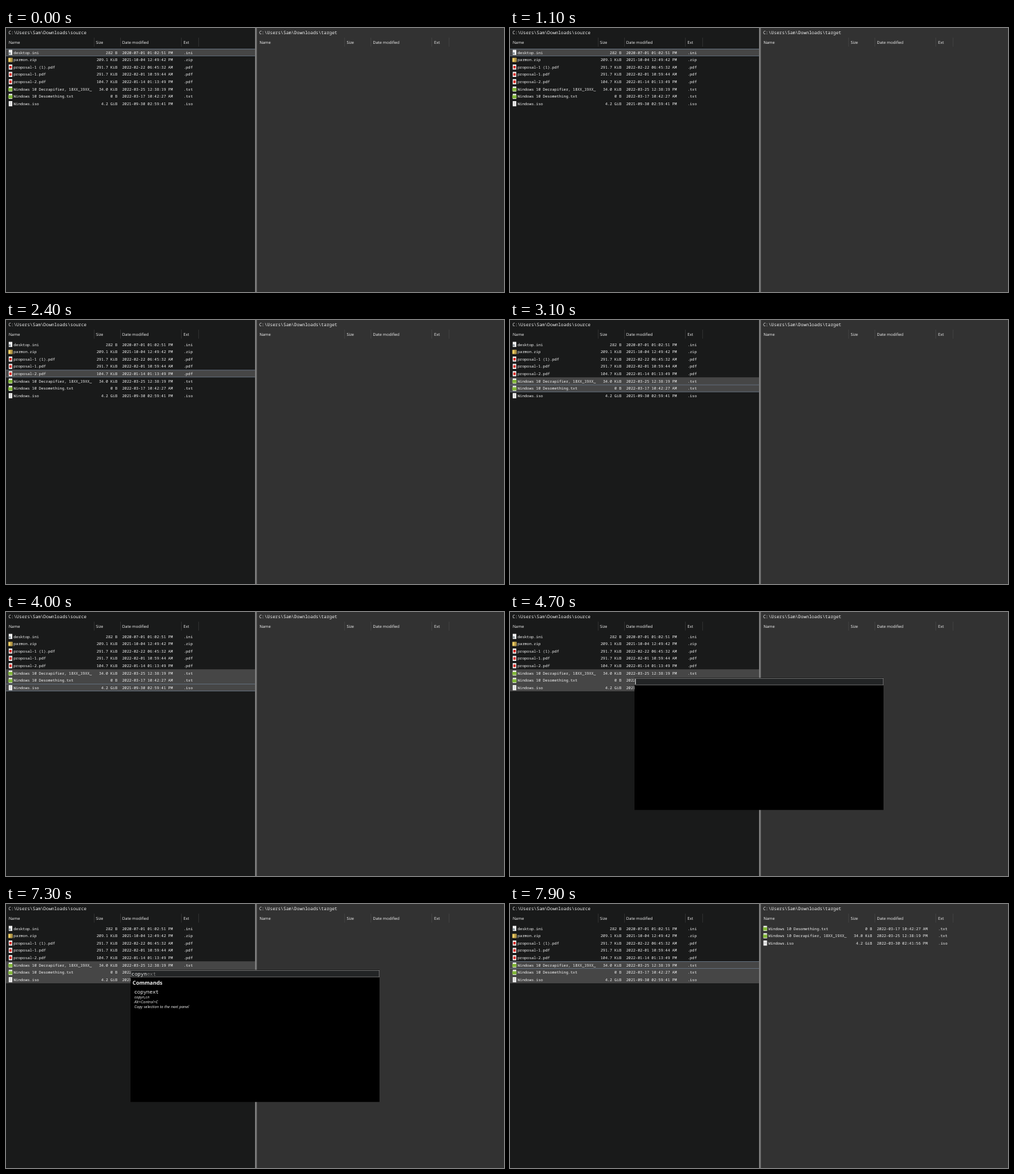
An HTML page for the animation above (8 s loop, 720 by 383 pixels).

```html
<!DOCTYPE html>
<html lang="en">
<head>
<meta charset="utf-8">
<title>Dual-pane file copy</title>
<style>
  html, body { margin: 0; width: 100%; height: 100%; overflow: hidden; background: #191a1a; }
  svg { display: block; width: 100%; height: 100%; }
  text { fill: #f0f0f0; white-space: pre; text-rendering: geometricPrecision; }
  .cell, .path, .cmd { font-family: "Noto Sans Mono", "DejaVu Sans Mono", monospace; }
  .head, .title, .note { font-family: "Open Sans", "Noto Sans", sans-serif; }
  .cell { font-size: 5.56px; }
  .path { font-size: 6.5px; }
  .cmd { font-size: 7.39px; }
  .head { font-size: 5.8px; }
  .title { font-size: 7.7px; font-weight: 700; }
  .note { font-size: 5.7px; font-style: italic; }
  .end { text-anchor: end; }
  .ghost { fill: #7c7c7c; }
</style>
</head>
<body>
<svg id="stage" viewBox="0 0 720 383" preserveAspectRatio="none"></svg>
<script>
const LOOP = 8000, ROW = 10.63, TOP = 30, CHAR = 4.434;
const USER = 'C:\\Users\\Sam\\';

const files = [
  ['desktop.ini', '282 B', '2020-07-01 01:02:51 PM', 'ini'],
  ['parmon.zip', '209.1 KiB', '2021-10-04 12:49:42 PM', 'zip'],
  ['proposal-1 (1).pdf', '291.7 KiB', '2022-02-22 06:45:32 AM', 'pdf'],
  ['proposal-1.pdf', '291.7 KiB', '2022-02-01 10:59:44 AM', 'pdf'],
  ['proposal-2.pdf', '104.7 KiB', '2022-01-14 01:13:49 PM', 'pdf'],
  ['Windows 10 Decrapifier, 18XX_19XX_', '34.0 KiB', '2022-03-25 12:38:19 PM', 'txt'],
  ['Windows 10 Desomething.txt', '0 B', '2022-03-17 10:42:27 AM', 'txt'],
  ['Windows.iso', '4.2 GiB', '2021-09-30 02:59:41 PM', 'iso']
];
const copies = [files[6], files[5], ['Windows.iso', '4.2 GiB', '2022-03-30 02:41:56 PM', 'iso']];

// Each step: [start time, value]
const focusSteps = [[0, 0], [1800, 1], [2000, 2], [2200, 3], [2300, 4], [2500, 5], [3000, 6], [3300, 7], [7700, 5]];
const markSteps = [[0, 0], [3000, 2], [3300, 3]];
const copySteps = [[0, 0], [7800, 2], [7900, 3]];
const typeSteps = [[4700, 0], [5700, 1], [6000, 2], [6200, 3], [6400, 4], [6700, 5]];
const OPEN = 4700, LISTED = 4900, CLOSE = 7700;

const stepAt = (steps, t) => steps.filter(s => s[0] <= t).pop();

const rect = (x, y, w, h, fill, extra = '') =>
  `<rect x="${x}" y="${y}" width="${w}" height="${h}" fill="${fill}" ${extra}/>`;
const text = (x, y, cls, s) => `<text x="${x}" y="${y}" class="${cls}">${s}</text>`;

function icon(x, y, type) {
  if (type === 'zip')
    return rect(x, y + 1, 6, 6, '#f2cf63') + rect(x + 3.4, y + 1, 1.4, 6, '#8d7433');
  const page = rect(x + .5, y, 5.2, 7.4, '#f1f1f1');
  if (type === 'pdf') return page + rect(x + 1.4, y + 2, 3.4, 3.6, '#d8261c');
  if (type === 'txt') return page + rect(x, y + 2, 6, 4.6, '#83b83a');
  if (type === 'ini') return page + `<circle cx="${x + 2}" cy="${y + 5}" r="1.6" fill="#8c969c"/>`;
  return page + rect(x + 1.5, y + 2, 3, .6, '#aaa') + rect(x + 1.5, y + 4, 3, .6, '#aaa');
}

function fileRow([name, size, date, ext], i, x) {
  const y = TOP + i * ROW, base = y + 7.5;
  return icon(x + 3.4, y + 1.7, ext) + text(x + 11, base, 'cell', name) +
    text(x + 161, base, 'cell end', size) + text(x + 168, base, 'cell', date) +
    text(x + 256.7, base, 'cell', '.' + ext);
}

function panel(x, dir, list, line) {
  const heads = [[4, 'Name'], [130, 'Size'], [168, 'Date modified'], [256.5, 'Ext']];
  return text(x + 3.4, 9.2, 'path', USER + 'Downloads\\' + dir) +
    heads.map(([dx, s]) => text(x + dx, 22.7, 'head', s)).join('') +
    [127, 165, 253, 278].map(dx => rect(x + dx, 14, .6, 13, line)).join('') +
    list.map((f, i) => fileRow(f, i, x)).join('');
}

function highlights(t) {
  const focus = stepAt(focusSteps, t)[1], marks = stepAt(markSteps, t)[1];
  const dialog = t >= OPEN && t < CLOSE;
  let out = rect(0, TOP + 5 * ROW, 360, marks * ROW, '#464646');
  if (dialog) return out;
  const y = TOP + focus * ROW;
  out += rect(0, y, 360, ROW, '#464646');
  for (const edge of [y, y + ROW - .6]) out += rect(0, edge, 360, .6, '#708296');
  return out;
}

function command(y, name, alias, keys, note) {
  return text(185.4, y, 'cmd', name) +
    [alias, keys, note].map((s, i) => text(185.4, y + 7.2 + i * 7.1, 'note', s)).join('');
}

function results(typed, narrowed) {
  let y = 116.8, out = '';
  if (typed < 3) {
    out += text(183, y, 'title', 'History') +
      text(185.4, y + 12.8, 'cmd', USER + 'AppData\\Local\\Brows\\data\\BookmarkCollectionModel');
    y += 26;
  }
  out += text(183, y, 'title', 'Commands') +
    command(y + 12.8, 'copynext', 'copyn,cn', 'Alt+Control+C', 'Copy selection to the next panel');
  if (!narrowed)
    out += command(y + 45.1, 'copyprev', 'copyp,cp', 'Alt+Control+Shift+C', 'Copy selection to the previous panel');
  return out;
}

function dialog(t) {
  if (t < OPEN || t >= CLOSE) return '';
  const [since, typed] = stepAt(typeSteps, t), word = 'copynext', x = 181.5;
  let out = rect(180, 95.6, 360, 191.6, '#000') +
    rect(180.8, 96.3, 358.9, 9.6, '#222425', 'stroke="#858585" stroke-width=".7"');
  if (typed)
    out += text(x, 103.6, 'cmd', word.slice(0, typed)) +
      text(x + typed * CHAR, 103.6, 'cmd ghost', word.slice(typed));
  if (t - since < 600) out += rect(x + typed * CHAR - .2, 97, .7, 8, '#fff');
  return out + (t >= LISTED ? results(typed, t >= 6800) : '');
}

const stage = document.getElementById('stage');
let shown = '';

function draw() {
  const t = performance.now() % LOOP;
  const picture = rect(0, 0, 720, 383, '#191a1a') + rect(362, 0, 358, 383, '#323232') +
    highlights(t) +
    panel(0, 'source', files, '#3b3b3b') +
    panel(362.5, 'target', copies.slice(0, stepAt(copySteps, t)[1]), '#4b4b4b') +
    rect(360, 0, 2.6, 383, '#7c7c7c') + dialog(t);
  if (picture !== shown) stage.innerHTML = shown = picture;
  requestAnimationFrame(draw);
}
draw();
</script>
</body>
</html>
```
